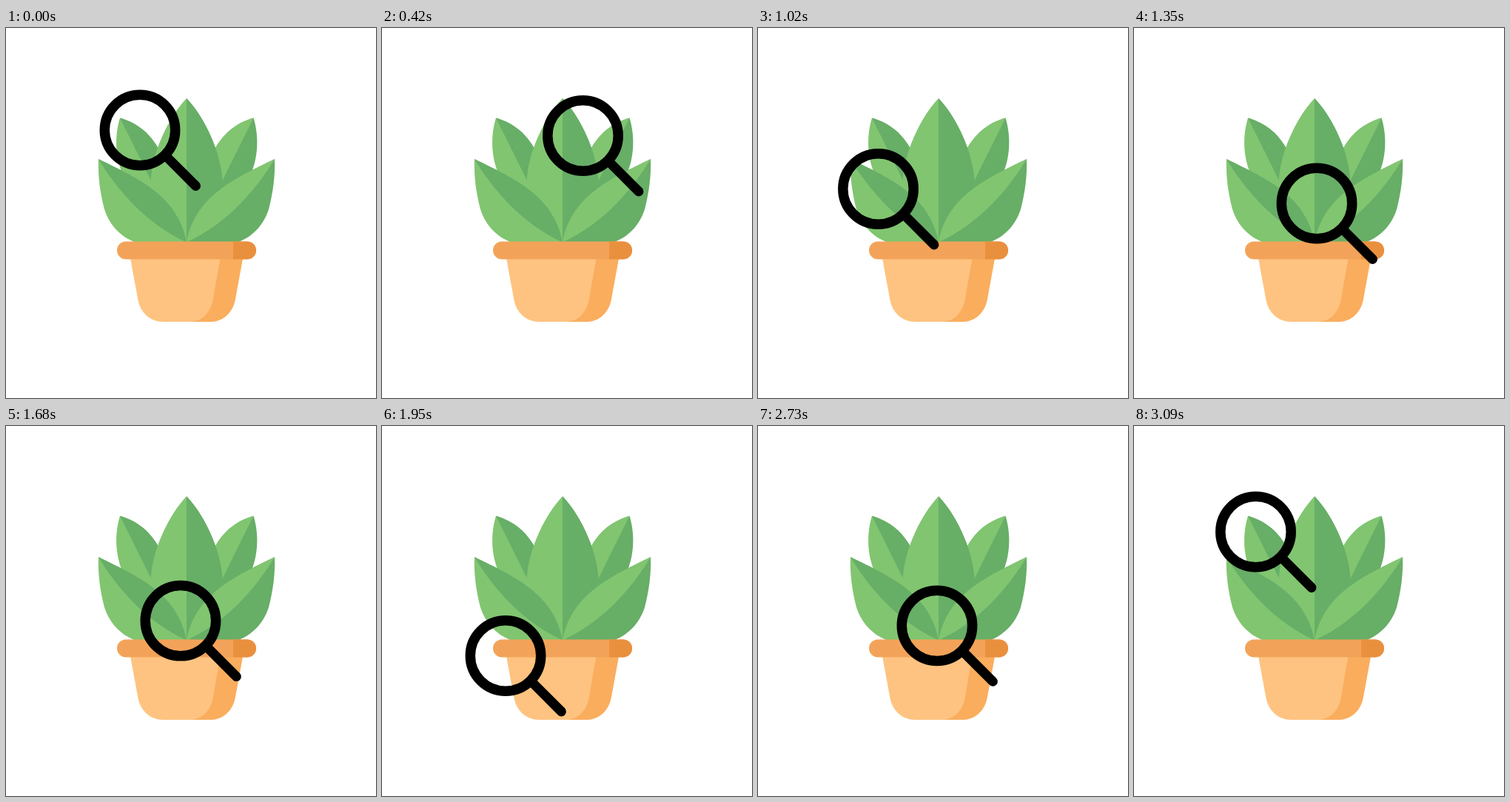
Recreate the animation shown at these times as an HTML page. Size 500 px wide and 500 px high, loop 3.12 s.

```html
<!DOCTYPE html>
<html lang="en">
<head>
<meta charset="utf-8">
<title>Plant search</title>
<style>
  html, body { margin: 0; width: 100%; height: 100%; overflow: hidden; background: #fff; }
  svg { display: block; width: 100vw; height: 100vh; }
  .light { fill: #81c570; }
  .dark { fill: #67ae67; }
</style>
</head>
<body>
<svg viewBox="0 0 500 500">
  <defs>
    <!-- each leaf: the whole blade, then its inner half on top -->
    <path id="back" d="M154 121.500C147 144 147 172 157 196L170 230H212L206 163C196 145 180 129 154 121.500Z"/>
    <path id="backInner" d="M154 121.500C180 129 196 145 206 163L212 230L196 206Z"/>
    <path id="mid" d="M244 95C220 120 197 168 195.500 208L205 240L244 289L283 240L292.500 208C291 168 268 120 244 95Z"/>
    <path id="midInner" d="M244 95C268 120 291 168 292.500 208L283 240L244 289Z"/>
    <path id="front" d="M125 177C124 199 127 222 133 245C140 267 156 283 175 289.500H244C232 223 170 200 125 177Z"/>
    <path id="frontInner" d="M125 177C170 200 232 223 244 289.500C190 265 150 219 125 177Z"/>
  </defs>

  <use href="#back" class="light"/>
  <use href="#backInner" class="dark"/>
  <g transform="matrix(-1 0 0 1 488.500 0)">
    <use href="#back" class="dark"/>
    <use href="#backInner" class="light"/>
  </g>
  <use href="#mid" class="light"/>
  <use href="#midInner" class="dark"/>
  <use href="#front" class="light"/>
  <use href="#frontInner" class="dark"/>
  <g transform="matrix(-1 0 0 1 488 0)">
    <use href="#front" class="dark"/>
    <use href="#frontInner" class="light"/>
  </g>

  <path fill="#fec380" d="M168 311H320L309.500 368C306 385 293 397 276 397H212C195 397 182 385 178.500 368Z"/>
  <path fill="#faad5d" d="M289.500 311H320L309.500 368C306 385 293 397 276 397H248C265 397 276 385 279.500 368Z"/>
  <rect x="150" y="288.500" width="188" height="24" rx="12" fill="#f2a359"/>
  <path fill="#e9903e" d="M307 288.500H326A12 12 0 0 1 326 312.500H307Z"/>

  <g id="glass" fill="none" stroke="#000">
    <circle r="47.700" stroke-width="13.500"/>
    <path d="M36 36L75.400 75.400" stroke-width="13" stroke-linecap="round"/>
  </g>
</svg>
<script>
const LOOP = 3120, STEP = 30;
const glass = document.getElementById('glass');

// key points of the zigzag: time, then x and y of the lens centre
const keys = [
  [0, 181, 138], [420, 271.5, 145.5], [540, 279, 162], [1020, 162.5, 217.5],
  [1350, 247, 237], [1500, 266, 240], [1950, 167, 310.5], [2160, 173, 332],
  [2310, 212.5, 359], [2500, 249, 358], [2700, 245, 281], [3090, 164.5, 143]
];
const last = keys.length - 1;

const speed = (i, k) => (keys[i + 1][k] - keys[i][k]) / (keys[i + 1][0] - keys[i][0]);

// tangent of the parabola through a key and its two neighbours
function tangent(i, k) {
  if (i === 0) return speed(0, k);
  if (i === last) return speed(last - 1, k);
  const before = keys[i][0] - keys[i - 1][0], after = keys[i + 1][0] - keys[i][0];
  return (speed(i - 1, k) * after + speed(i, k) * before) / (before + after);
}

function position(t) {
  const i = Math.min(keys.findLastIndex(p => p[0] <= t), last - 1);
  const a = keys[i], b = keys[i + 1];
  const span = b[0] - a[0], u = (t - a[0]) / span, v = 1 - u;
  const ease = u * u * (3 - 2 * u);
  return [1, 2].map(k => a[k] + (b[k] - a[k]) * ease +
    span * u * v * (v * tangent(i, k) - u * tangent(i + 1, k)));
}

const start = performance.now();
function tick() {
  const t = Math.floor((performance.now() - start) % LOOP / STEP) * STEP;
  glass.setAttribute('transform', `translate(${position(t)})`);
  requestAnimationFrame(tick);
}
tick();
</script>
</body>
</html>
```
